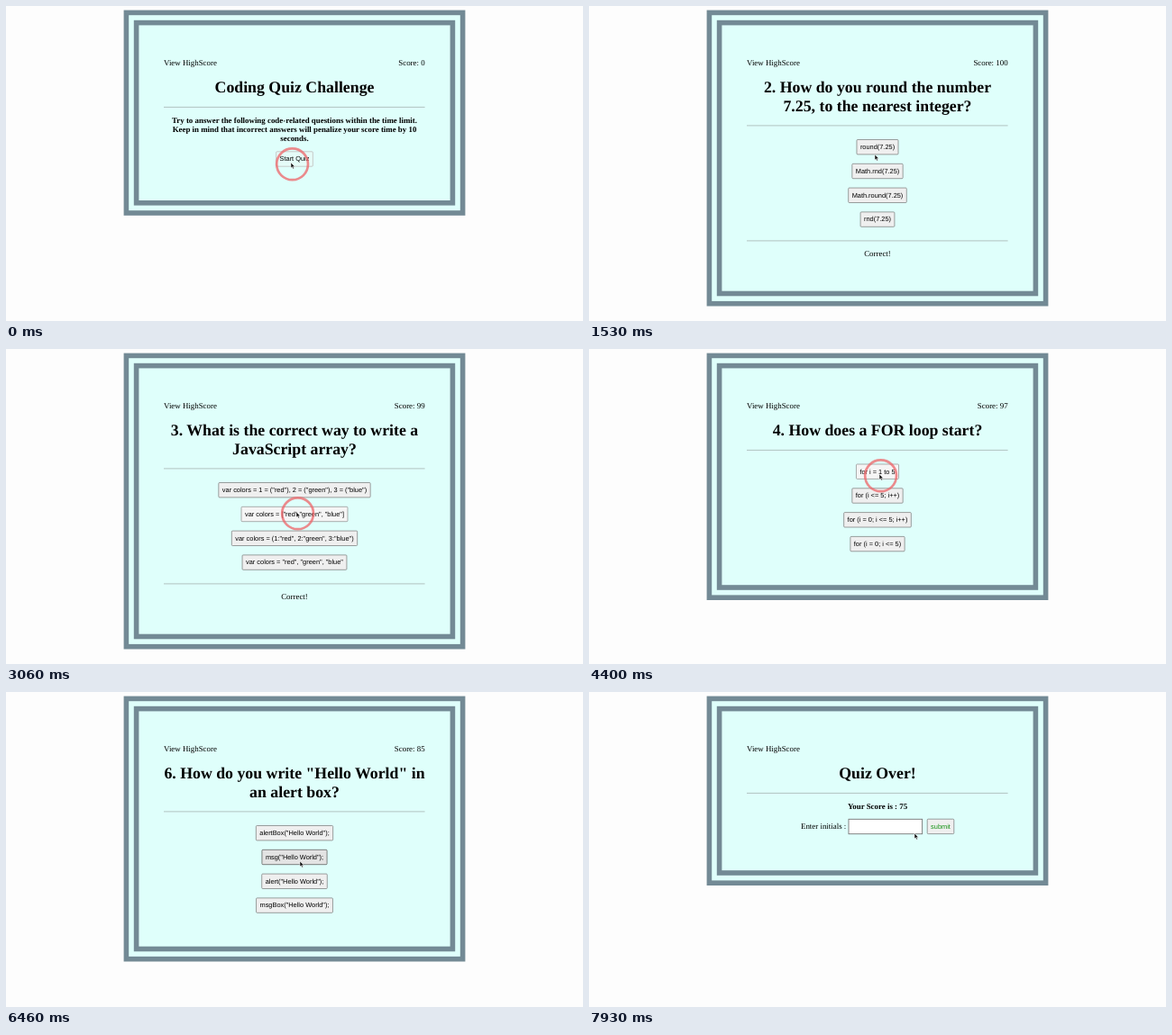
An HTML page that plays this animation: 640 px wide and 350 px high, repeating every 8 s.

```html
<!DOCTYPE html>
<html lang="en">
<head>
<meta charset="utf-8">
<title>Coding Quiz</title>
<style>
  html, body { margin: 0; width: 100%; height: 100%; overflow: hidden; background: #fdfdfd; }
  svg { display: block; width: 640px; height: 350px; }
  text { font: 8.9px "Liberation Serif", "Times New Roman", serif; text-rendering: geometricPrecision; white-space: pre; }
  .mid { text-anchor: middle; }
  .end { text-anchor: end; }
  .bold { font-weight: bold; }
  .title { font-size: 17.8px; font-weight: bold; }
  .label { font: 7.4px "Liberation Sans", Arial, sans-serif; }
</style>
</head>
<body>
<svg id="stage" viewBox="0 0 640 350"></svg>
<script>
const LOOP = 8000, LIGHT = '#dffffb', SLATE = '#738a95';
const stage = document.getElementById('stage');
const pen = document.createElement('canvas').getContext('2d');
pen.font = '74px "Liberation Sans", Arial, sans-serif';

const questions = [
  { title: ['1. Which operator is used to assign a', 'value to a variable?'],
    answers: ['=', 'x', '*', '-'] },
  { title: ['2. How do you round the number', '7.25, to the nearest integer?'],
    answers: ['round(7.25)', 'Math.rnd(7.25)', 'Math.round(7.25)', 'rnd(7.25)'] },
  { title: ['3. What is the correct way to write a', 'JavaScript array?'],
    answers: ['var colors = 1 = ("red"), 2 = ("green"), 3 = ("blue")', 'var colors = ["red","green", "blue"]',
      'var colors = (1:"red", 2:"green", 3:"blue")', 'var colors = "red", "green", "blue"'] },
  { title: ['4. How does a FOR loop start?'],
    answers: ['for i = 1 to 5', 'for (i <= 5; i++)', 'for (i = 0; i <= 5; i++)', 'for (i = 0; i <= 5)'] },
  { title: ['5. Inside which HTML element do', 'we put the JavaScript code that', 'a page should run?'],
    answers: ['<script>', '<javascript>', '<js>', '<scripting>'] },
  { title: ['6. How do you write "Hello World" in', 'an alert box?'],
    answers: ['alertBox("Hello World");', 'msg("Hello World");', 'alert("Hello World");', 'msgBox("Hello World");'] }
];

// Each click opens the next page; the verdict stays for one second.
const clicks = [60, 1060, 2200, 3130, 4460, 5400, 7060];
const verdicts = ['', 'Correct!', 'Correct!', 'Correct!', 'Wrong!', 'Correct!', ''];

// Pointer moves: start, end, x, y
const moves = [
  [130, 400, 317, 166], [600, 900, 318, 156], [1330, 2100, 312, 210], [2260, 2990, 322, 181],
  [3190, 3800, 323, 149], [3930, 4350, 322, 139], [4800, 5060, 324, 184], [6060, 6440, 326, 188],
  [6530, 6860, 329, 222], [6930, 7000, 330, 237], [7130, 7730, 394, 187], [7800, 7925, 361, 157]
];

const esc = s => s.replace(/&/g, '&amp;').replace(/</g, '&lt;');
const text = (s, x, y, cls = '', fill = '#000') =>
  `<text x="${x}" y="${y}" class="${cls}" fill="${fill}">${esc(s)}</text>`;
const rect = (x, y, w, h, fill, stroke, line, r = 0) =>
  `<rect x="${x}" y="${y}" width="${w}" height="${h}" rx="${r}" fill="${fill}" stroke="${stroke}" stroke-width="${line}"/>`;
const rule = y => `<path d="M175 ${y}H464.6" stroke="#adbcba" stroke-width=".9"/>`;

function panel(bottom) {
  const band = inset => rect(130.6 + inset, 4.6 + inset, 378.8 - 2 * inset, bottom - 4.6 - 2 * inset, LIGHT, SLATE, 5.6);
  return band(2.8) + band(14) + text('View HighScore', 175, 66);
}

function heading(lines) {
  return lines.map((s, i) => text(s, 320, 96 + i * 20.5, 'title mid')).join('') +
    rule(112.4 + (lines.length - 1) * 20.5);
}

function button(label, x, y, mouse, ink = '#000', fill = '#efefef', edge = '#767676') {
  const w = pen.measureText(label).width / 10 + 7.8, h = 16.4;
  const over = Math.abs(mouse.x - x) < w / 2 && Math.abs(mouse.y - y) < h / 2;
  if (over && fill === '#efefef') [fill, edge] = mouse.down ? ['#f5f5f5', '#8d8d8d'] : ['#e3e3e3', '#4f4f4f'];
  return rect(x - w / 2, y - h / 2, w, h, fill, edge, .7, 1) + text(label, x, y + 2.3, 'label mid', ink);
}

function intro(mouse) {
  const lines = ['Try to answer the following code-related questions within the time limit.',
    'Keep in mind that incorrect answers will penalize your score time by 10', 'seconds.'];
  return panel(232.8) + heading(['Coding Quiz Challenge']) +
    lines.map((s, i) => text(s, 320, 130 + i * 10.2, 'bold mid')).join('') +
    button('Start Quiz', 320, 170, mouse, '#000', '#e5fcf8', '#b9b3b3');
}

function quiz({ title, answers }, verdict, mouse) {
  const drop = (title.length - 1) * 20.5;
  return panel(279 + drop + (verdict ? 34 : 0)) + heading(title) +
    answers.map((s, i) => button(s, 320, 136.2 + drop + i * 26.8, mouse)).join('') +
    (verdict ? rule(240.4 + drop) + text(verdict, 320, 257.8 + drop, 'mid') : '');
}

function ending(mouse) {
  return panel(215) + heading(['Quiz Over!']) + text('Your Score is : 75', 320, 130, 'bold mid') +
    text('Enter initials :', 235, 152) + rect(288, 141.3, 81.6, 16.4, '#fff', '#767676', .9) +
    button('submit', 390, 149.4, mouse, '#149214');
}

function pointer(t) {
  let x = 316, y = 174;
  for (const [start, end, toX, toY] of moves) {
    const k = Math.min(1, Math.max(0, (t - start) / (end - start))), e = k * k * (3 - 2 * k);
    x += (toX - x) * e;
    y += (toY - y) * e;
  }
  return { x, y, down: clicks.some(c => t >= c - 130 && t < c + 65) };
}

function draw(t) {
  const mouse = pointer(t), page = clicks.filter(c => t >= c).length;
  const score = t < 1330 ? 0 : 100 - Math.floor((t - 1330) / 1000) - (t >= clicks[4] ? 10 : 0);
  let out;
  if (page === 0) out = intro(mouse);
  else if (page > questions.length) out = ending(mouse);
  else out = quiz(questions[page - 1], t < clicks[page - 1] + 1000 ? verdicts[page - 1] : '', mouse);
  if (page <= questions.length) out += text('Score: ' + score, 464.6, 66, 'end');
  if (mouse.down) out += `<circle cx="${mouse.x + 1.6}" cy="${mouse.y + 1.8}" r="17.4" fill="none" stroke="#ee6469" stroke-opacity=".75" stroke-width="2.7"/>`;
  out += `<path transform="translate(${mouse.x} ${mouse.y})" d="M0 0V6L1.4 4.8L2.3 6.9L3.4 6.4L2.5 4.4H4.4Z" fill="#111" stroke="#fff" stroke-width=".5"/>`;
  stage.innerHTML = out;
}

function tick() {
  draw(performance.now() % LOOP);
  requestAnimationFrame(tick);
}
tick();
</script>
</body>
</html>
```
